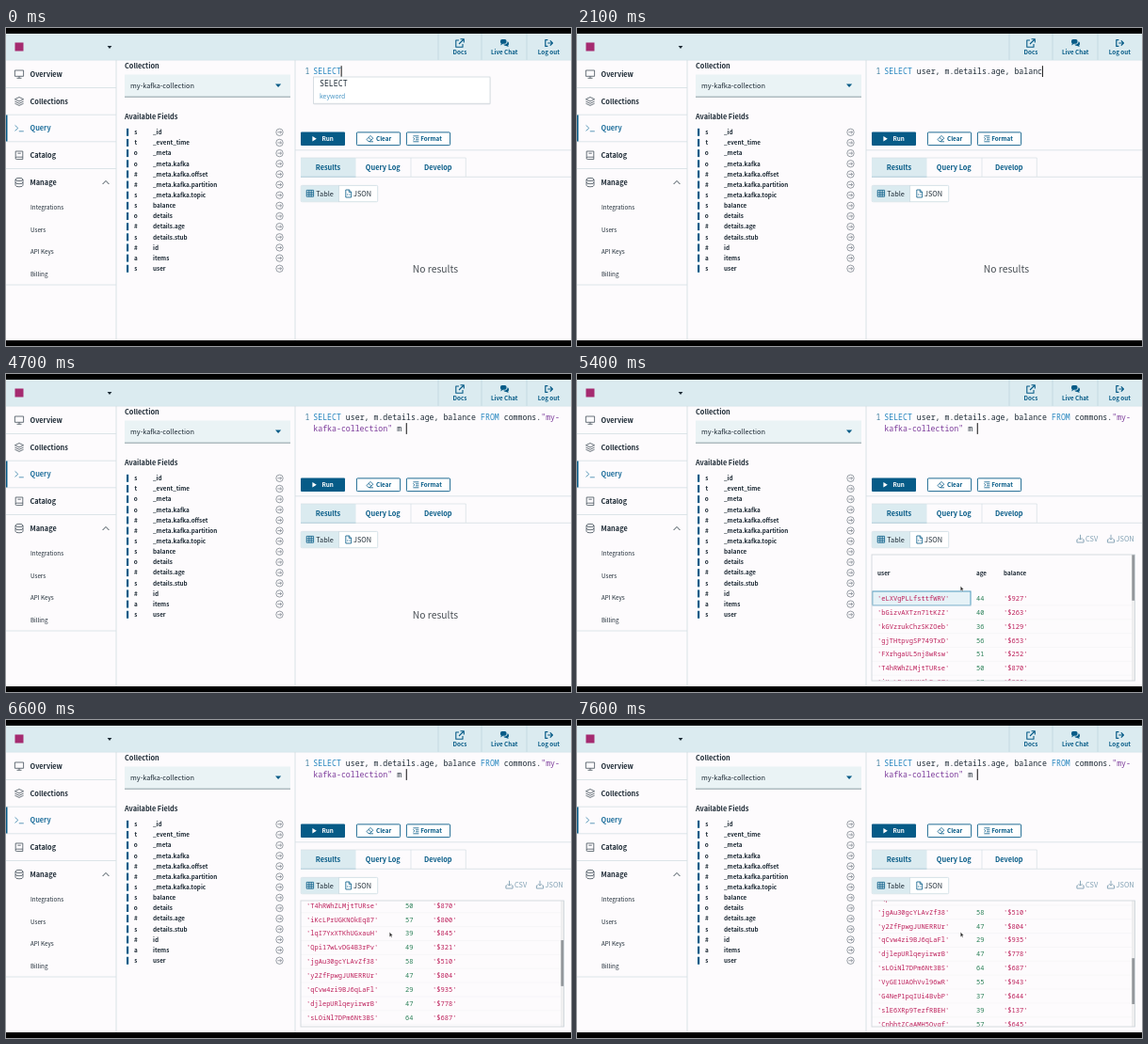
Animation, 600 px wide and 338 px high, one loop 7.7 s. Source, as an HTML page:

```html
<!DOCTYPE html>
<html lang="en">
<head>
<meta charset="utf-8">
<title>Query editor</title>
<style>
html, body { margin: 0; width: 100%; height: 100%; overflow: hidden; background: #000; }
svg { display: block; width: 100vw; height: 100vh; }
text { font-family: "Noto Sans CJK JP", "Noto Sans CJK SC", "Noto Sans", sans-serif; white-space: pre; }
text.mono { font-family: "Noto Sans Mono", "DejaVu Sans Mono", monospace; }
</style>
</head>
<body>
<svg id="stage" viewBox="0 0 600 338"></svg>
<script>
const LOOP = 7700, STEP = 100;
const BLUE = '#065b87', INK = '#1d2a35', GREY = '#6d7680', LINE = '#d5dfe4', PALE = '#dbebf0', PAGE = '#fdfbfd';
const SIZE = 7.35, SMALL = 6.3;
const CODE_SIZE = 8.23, PITCH = CODE_SIZE * 0.6, CODE_X = 326.3;
const CELL_SIZE = 7.05, ROW = 14.87, HEAD = 39;
const TOP = 192, VIEW = 134, CONTENT = 368;

const stage = document.getElementById('stage');
const rect = (x, y, w, h, fill, more = '') =>
  `<rect x="${x}" y="${y}" width="${w}" height="${h}" fill="${fill}" ${more}/>`;
const path = (d, stroke, width = 0.8, fill = 'none') =>
  `<path d="${d}" stroke="${stroke}" stroke-width="${width}" fill="${fill}" stroke-linejoin="round"/>`;
const label = (x, y, str, { size = SIZE, fill = INK, bold = false, mid = false, mono = false } = {}) =>
  `<text x="${x}" y="${y}" font-size="${size}" fill="${fill}"` +
  `${bold ? ' font-weight="700"' : ''}${mid ? ' text-anchor="middle"' : ''}${mono ? ' class="mono"' : ''}>${str}</text>`;
const group = (id, body, more = '') => `<g id="${id}" ${more}>${body}</g>`;

function header() {
  let s = rect(0, 6, 600, 28, PALE);
  for (const x of [459, 505, 553]) s += path(`M${x} 6V34`, '#bfd5df', 0.8);
  s += path('M0 34.2H600', '#cbdde4', 0.6);
  s += rect(9.5, 15.5, 9, 9, '#a52b70');
  s += path('M107.6 19H112.4L110 22Z', 'none', 0, INK);
  for (const [x, str] of [[482, 'Docs'], [529.2, 'Live Chat'], [576.3, 'Log out']])
    s += label(x, 28.3, str, { size: 6.25, fill: BLUE, bold: true, mid: true });
  s += path('M481 13H477.8V20.2H485V17M482.5 11.8H486.3V15.6M486 12L481 17', BLUE, 1.1);
  s += rect(525, 12, 6.5, 4.8, BLUE, 'rx="1.8"') + path('M526 16L525.2 18.6L528.2 16.6Z', 'none', 0, BLUE);
  s += path('M532.6 14.2Q534 14.6 534 16.4Q534 18 533.2 18.4L533.6 20L531.2 18.9Q528.8 19 528.2 17.6Q532.6 17.6 532.6 14.2Z', 'none', 0, BLUE);
  s += path('M575.4 12.6H572.8V19.4H575.4M575.2 16H580M577.8 13.3L580.4 16L577.8 18.7', BLUE, 1.2);
  return s;
}

function sidebar() {
  let s = path('M117 34V332M307 34V332', LINE, 0.9);
  for (const y of [63.5, 92.2, 120.8, 149.5, 273]) s += path(`M0 ${y}H117`, LINE, 0.8);
  s += rect(0, 92.5, 1.5, 28, BLUE);
  ['Overview', 'Collections', 'Query', 'Catalog', 'Manage'].forEach((str, i) => {
    s += label(25.5, 51.8 + i * 28.75, str, { bold: true, fill: i === 2 ? '#1f6f9c' : INK });
  });
  ['Integrations', 'Users', 'API Keys', 'Billing'].forEach((str, i) => {
    s += label(26, 193 + i * 23.55, str, { size: 6.25 });
  });
  s += path('M9.4 45H18.6V51.3H9.4ZM14 51.3V53.2M11.5 53.3H16.5', '#43505a');
  s += path('M14 73.5L18.6 75.7L14 77.9L9.4 75.7ZM9.4 78L14 80.2L18.6 78M9.4 80.2L14 82.4L18.6 80.2', '#43505a');
  s += path('M9.6 103.4L12.8 106.4L9.6 109.4M13.8 109.8H18.8', '#4d8fb3', 0.9);
  s += path('M10.2 131H17.8V139.6H11.4Q10.2 139.6 10.2 138.4ZM10.2 138.2Q10.4 137.2 11.4 137.2H17.8M12.4 133.2H15.8', '#43505a');
  s += '<g fill="none" stroke="#43505a" stroke-width=".8"><ellipse cx="14" cy="161" rx="4" ry="1.6"/>' +
    '<path d="M10 161V167.2Q10 168.8 14 168.8T18 167.2V161M10 164Q10 165.7 14 165.7T18 164"/></g>';
  s += path('M102.6 166L106 162.4L109.4 166', '#43505a', 1);
  return s;
}

function fields() {
  let s = label(126, 43, 'Collection', { bold: true });
  s += rect(126, 49.5, 176, 23.5, '#eaf3f5') + path('M126 73.2H302', '#7f9299', 0.9);
  s += label(132, 64, 'my-kafka-collection') + path('M286 59.6H292.2L289.1 63Z', 'none', 0, BLUE);
  s += label(126, 97.2, 'Available Fields', { bold: true });
  const list = 's _id,t _event_time,o _meta,o _meta.kafka,# _meta.kafka.offset,# _meta.kafka.partition,' +
    's _meta.kafka.topic,s balance,o details,# details.age,s details.stub,# id,a items,s user';
  list.split(',').forEach((item, i) => {
    const [type, name] = item.split(' '), y = 110.8 + i * 11.15;
    s += rect(128, y - 4, 2.2, 8, BLUE);
    s += label(137.8, y + 2.3, type, { size: SMALL, bold: true, mid: true });
    s += label(156, y + 2.3, name, { size: SMALL, bold: true });
    s += `<circle cx="290.5" cy="${y}" r="3.7" fill="none" stroke="${GREY}" stroke-width=".7"/>`;
    s += path(`M288.4 ${y}H292.4M290.9 ${y - 1.6}L292.5 ${y}L290.9 ${y + 1.6}`, GREY, 0.7);
  });
  return s;
}

function controls() {
  let s = label(317.4, 49, '1', { mono: true, size: CODE_SIZE, fill: '#3c7d9e' });
  s += rect(313, 110.5, 47, 14.5, BLUE, 'rx="1"') + path('M325.4 115L329.8 117.7L325.4 120.4Z', 'none', 0, '#fff');
  s += label(341.7, 120.2, 'Run', { size: SMALL, fill: '#fff', bold: true, mid: true });
  for (const [x, str, tx] of [[372.4, 'Clear', 393], [425.4, 'Format', 440.3]]) {
    s += rect(x, 110.9, 46.2, 13.7, '#fff', `rx="1" stroke="${BLUE}" stroke-width=".9"`);
    s += label(tx, 120.2, str, { size: SMALL, fill: BLUE, bold: true });
  }
  s += path('M383 118.4L387 114.4L389.8 117.2L386.4 120.6H384.8ZM385 116.4L387.9 119.2M386 120.8H390', BLUE, 0.8);
  s += path('M432.4 114.8H438.4M435 116.8H438.4M435 118.8H438.4M432.4 120.8H438.4M432.4 116.4L434 117.8L432.4 119.2', BLUE, 0.8);
  s += path('M307 129.8H600M313 158.3H600', LINE, 0.8);
  s += rect(313, 138, 58.5, 20.3, PALE) + path('M371.5 138H488.3V158M430 138V158M313 138H371.5', LINE, 0.7);
  s += path('M313 158.2H371.5', '#a9c8d6', 0.8);
  for (const [x, str] of [[342, 'Results'], [400.3, 'Query Log'], [458.8, 'Develop']])
    s += label(x, 150.9, str, { fill: BLUE, bold: true, mid: true });
  s += rect(313.3, 167.4, 81.4, 17.3, '#fff', `rx="1" stroke="#c5d6de" stroke-width=".7"`);
  s += rect(313.6, 167.7, 39.8, 16.7, PALE) + path('M353.5 167.4V184.7', '#c5d6de', 0.7);
  s += path('M319.2 172.4H326.6V179.2H319.2ZM319.2 174.8H326.6M319.2 177H326.6M321.8 172.4V179.2M324.2 172.4V179.2', BLUE, 0.8);
  s += path('M360.8 172H364.4L366.6 174.2V180H360.8ZM364.2 172V174.4H366.6', BLUE, 0.8);
  s += path('M363.2 176L362.2 177L363.2 178M364.4 176L365.4 177L364.4 178', BLUE, 0.5);
  return s + label(329.3, 179, 'Table') + label(369, 179, 'JSON');
}

const users = ('eLXVgPLLfsttfWRV bGizvAXTzn71tKZZ kGVzrukChzSKZOeb gjTHtpvgSP749TxD FXrhgaUL5nj8wRsw ' +
  'T4hRWhZLMjtTURse iKcLPrUGKNOkEq87 lqI7YxXTKhUGxauH Qpi17wLvDG4B3rPv jgAu30gcYLAvZf38 y2ZfFpwgJUNERRUr ' +
  'qCvw4zi9BJ6qLaFl djlepURlqeyirwrB sLOiNl7DPm6Nt3BS VyGE1UAOhVvl96wR G4NeP1pqIUi4BvbP slE6XRp9TezfRBEH ' +
  'CnhhtZCaAMH5Ovqf').split(' ');
const ages = '44 40 36 56 51 50 57 39 49 58 47 29 47 64 55 37 39 57'.split(' ');
const sums = '927 263 129 653 252 870 800 845 321 510 804 935 778 687 943 644 137 645'.split(' ');

function table() {
  const cell = (x, y, str, fill) => label(x, y, str, { mono: true, size: CELL_SIZE, fill });
  let rows = '';
  [[319, 'user'], [424, 'age'], [453, 'balance']].forEach(([x, str]) => {
    rows += label(x, TOP + HEAD / 2 + 2.5, str, { size: SMALL, bold: true });
  });
  rows += rect(313.8, TOP + HEAD, 104.2, ROW, '#e6f2f7', 'stroke="#4f9abd" stroke-width="1"');
  users.forEach((user, i) => {
    const y = TOP + HEAD + i * ROW, base = y + 9.9;
    if (i) rows += path(`M313 ${y}H589`, '#f0f0f3', 0.5);
    rows += cell(319, base, `'${user}'`, '#bd1f5a') + cell(424, base, ages[i], '#2b8058') +
      cell(453, base, `'$${sums[i]}'`, '#bd1f5a');
  });
  let s = `<clipPath id="view"><rect x="313" y="${TOP}" width="280" height="${VIEW}"/></clipPath>`;
  s += rect(313, TOP, 279.5, VIEW, PAGE);
  s += `<g clip-path="url(#view)">${group('rows', rows)}</g>`;
  s += rect(589, TOP, 3.5, VIEW, '#eeeeef') + rect(589.3, TOP, 3, VIEW * VIEW / CONTENT, '#93979b', 'id="thumb"');
  s += rect(313, TOP, 279.5, VIEW, 'none', 'stroke="#cbd3d8" stroke-width=".8"');
  const tone = '#7f9fb2';
  for (const [x, str] of [[530.5, 'CSV'], [563, 'JSON']]) {
    s += path(`M${x + 4} 170.8V176M${x + 2} 174.2L${x + 4} 176.2L${x + 6} 174.2M${x + 1.8} 176H${x + 0.4}V179H${x + 7.6}V176H${x + 6.2}`, tone, 0.9);
    s += label(x + 9.6, 178, str, { fill: tone });
  }
  return s;
}

const popup = rect(326.5, 52.5, 188, 29, '#8a9aa4', 'opacity=".18" rx="1"') +
  rect(326.5, 52, 187.5, 28.2, '#fff', 'stroke="#c9d2d8" stroke-width=".7"') +
  label(333, 62.2, 'SELECT', { mono: true, size: CODE_SIZE }) +
  label(333, 74.6, 'keyword', { size: 6.8, fill: '#4795c4' });

stage.innerHTML = rect(0, 0, 600, 338, '#000') + rect(0, 6, 600, 326, PAGE) + header() + sidebar() + fields() + controls() +
  group('empty', label(456, 260.3, 'No results', { size: 10.35, fill: '#4a5056', mid: true })) +
  group('table', table()) + group('code', '') + rect(0, 40.2, 1, 11.8, '#111', 'id="caret"') +
  group('popup', popup) +
  group('pointer', path('M0 -2.6V2.2L1.1 1.2L1.9 2.9L2.7 2.5L1.9 0.9H3.3Z', '#fff', 0.3, '#222'));

const el = Object.fromEntries(['empty', 'table', 'code', 'caret', 'popup', 'pointer', 'rows', 'thumb']
  .map(id => [id, document.getElementById(id)]));

const tokens = [
  ['SELECT', '#2586bf'], [' user, m.details.age, balance ', INK], ['FROM', '#2586bf'],
  [' commons.', INK], ['"my-', '#7b3a9a'], ['kafka-collection"', '#7b3a9a'], [' m ', INK]
];
const WRAP = 53;

// Linear interpolation through [time, value] points.
function track(points, t) {
  for (let i = 1; i < points.length; i++) {
    const [t0, v0] = points[i - 1], [t1, v1] = points[i];
    if (t <= t1) return v0 + (v1 - v0) * Math.max(0, (t - t0) / (t1 - t0));
  }
  return points[points.length - 1][1];
}

const typed = [[0, 6], [800, 19], [1300, 28], [1400, 28], [2100, 34], [2200, 34], [3000, 40], [3200, 41],
  [3300, 41], [3700, 53], [3800, 53], [4400, 73]];
const scroll = [[5400, 0], [5900, 44], [6600, 115.5], [7600, 168]];
const pointerX = [[4800, 340], [5000, 340], [5400, 407.3]];
const pointerY = [[4800, 118], [5000, 118], [5400, 228.2]];

const place = i => i < WRAP ? [CODE_X + i * PITCH, 49] : [CODE_X + (i - WRAP) * PITCH, 60.9];
const show = (node, on) => node.setAttribute('visibility', on ? 'visible' : 'hidden');

function drawCode(count) {
  let s = '', at = 0;
  for (const [str, color] of tokens) {
    const part = str.slice(0, Math.max(0, count - at));
    const fill = str === 'FROM' && part !== str ? INK : color;
    const lead = part.length - part.trimStart().length;
    const [x, y] = place(at + lead);
    if (part.trim()) s += label(x, y, part.trim(), { mono: true, size: CODE_SIZE, fill });
    at += str.length;
  }
  el.code.innerHTML = s;
  const [x, y] = count === WRAP ? [CODE_X + WRAP * PITCH, 49] : place(count);
  el.caret.setAttribute('x', x - 0.3);
  el.caret.setAttribute('y', y - 8.8);
}

function render(ms) {
  const t = Math.floor((ms % LOOP) / STEP) * STEP;
  drawCode(Math.floor(track(typed, t) + 1e-6));
  show(el.popup, t < 100);
  show(el.empty, t < 5100);
  show(el.table, t >= 5100);
  show(el.pointer, t >= 4800);
  el.pointer.setAttribute('transform', `translate(${track(pointerX, t)} ${track(pointerY, t)})`);
  const offset = track(scroll, t);
  el.rows.setAttribute('transform', `translate(0 ${-offset})`);
  el.thumb.setAttribute('y', TOP + offset * VIEW / CONTENT);
}

const start = performance.now();
function tick() {
  render(performance.now() - start);
  requestAnimationFrame(tick);
}
render(0);
requestAnimationFrame(tick);
</script>
</body>
</html>
```
